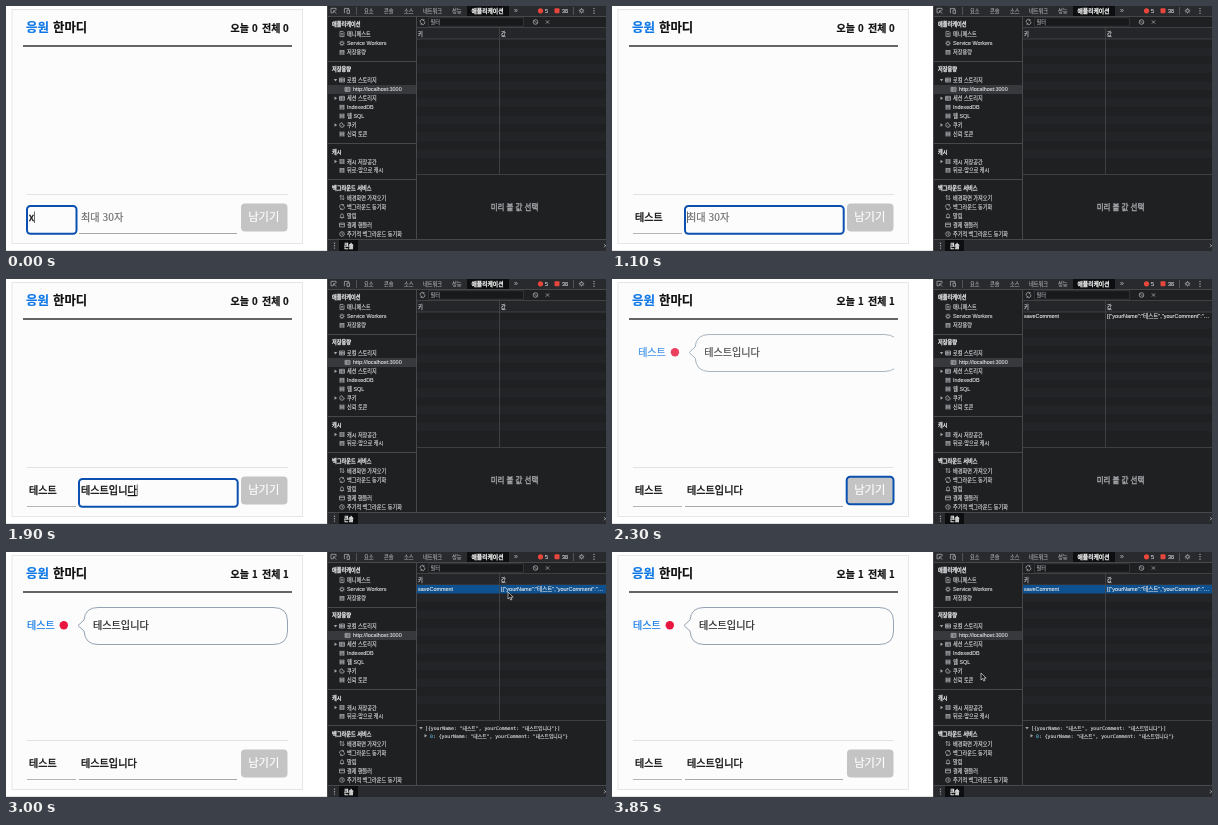
An HTML page that plays this animation: 600x245 px, repeating every 3900 ms.

```html
<!DOCTYPE html>
<html lang="ko">
<head>
<meta charset="utf-8">
<style>
html, body { margin: 0; width: 100%; height: 100%; overflow: hidden; background: #fff; }
svg { display: block; width: 600px; height: 245px; }
text { font-family: "Liberation Sans", "Noto Sans CJK KR", sans-serif; white-space: pre; stroke-width: .12; }
.page text { font-family: "Noto Sans CJK KR", sans-serif; stroke-width: .2; }
.mono text { font-family: "DejaVu Sans Mono", "Noto Sans CJK KR", monospace; }
text.medium { stroke-width: .35; }
</style>
</head>
<body>
<svg id="stage" viewBox="0 0 600 245"></svg>
<script>
const LOOP = 3900;
const BLUE = '#0b50ae', LINK = '#0f78e6', GREY = '#a4a7ab', LIGHT = '#d9dbde';
const PANEL = '#1f2022', BAR = '#292a2d', EDGE = '#46484b';

const text = (x, y, s, size, fill, extra = '') =>
  `<text x="${x}" y="${y}" font-size="${size}" fill="${fill}" stroke="${fill}" ${extra}>${s}</text>`;
const rect = (x, y, w, h, fill, extra = '') =>
  `<rect x="${x}" y="${y}" width="${w}" height="${h}" fill="${fill}" ${extra}/>`;
const line = (d, stroke, width = 1, extra = '') =>
  `<path d="${d}" fill="none" stroke="${stroke}" stroke-width="${width}" ${extra}/>`;
const dot = (x, y, r, fill) => `<circle cx="${x}" cy="${y}" r="${r}" fill="${fill}"/>`;
const group = (id, body, extra = '') => `<g id="${id}" ${extra}>${body}</g>`;
const BOLD = 'font-weight="700"', MEDIUM = 'class="medium"';

// Small line icons, drawn around their own centre
const shapes = {
  doc: 'M-2-2.6H1L2-1.6V2.6H-2ZM-1-.6H1M-1 .9H1',
  gear: 'M-1.5 0A1.5 1.5 0 1 0 1.5 0A1.5 1.5 0 1 0-1.5 0M0-2.7V-1.5M0 1.5V2.7M-2.7 0H-1.5M1.5 0H2.7M-1.9-1.9L-1-1M1 1L1.9 1.9M-1.9 1.9L-1 1M1-1L1.9-1.9',
  db: 'M-2-1.8H2M-2-.6H2M-2 .6H2M-2 1.8H2M-2-2.4V2.4M2-2.4V2.4',
  table: 'M-2.5-2H2.5V2H-2.5ZM-2.5-.6H2.5M-2.5 .7H2.5M-.8-2V2',
  cookie: 'M0-2.3A2.3 2.3 0 1 0 2.3 0L.8-.3ZM-.8 0V.5M.3 1V1.4',
  arrows: 'M-1.2 2.5V-2.3L-2.4-1M-1.2-2.3L0-1M1.2-2.5V2.3L2.4 1M1.2 2.3L0 1',
  sync: 'M-2.1 .6A2.1 2.1 0 0 1 1.5-1.6M2.1-.6A2.1 2.1 0 0 1-1.5 1.6M1.5-2.8V-1.4H.2M-1.5 2.8V1.4H-.2',
  bell: 'M-2 1.5H2L1.4 .7V-.7A1.4 1.4 0 0 0-1.4-.7V.7ZM-.5 2.3H.5',
  card: 'M-2.5-1.9H2.5V1.9H-2.5ZM-2.5-.6H2.5',
  clock: 'M-2.3 0A2.3 2.3 0 1 0 2.3 0A2.3 2.3 0 1 0-2.3 0M0-1.4V0L1 .7',
  ban: 'M-2.3 0A2.3 2.3 0 1 0 2.3 0A2.3 2.3 0 1 0-2.3 0M-1.6-1.6L1.6 1.6',
  cross: 'M-1.6-1.6L1.6 1.6M1.6-1.6L-1.6 1.6',
  inspect: 'M-.5 2H-2.5V-2.5H2.5V-.5M0 0L2.8 2.8M0 0V2M0 0H2',
  device: 'M-2.6 2.4V-2.4H1.8V-1M0-.8H2.5V2.6H0Z'
};
const icon = (kind, x, y) =>
  line(shapes[kind], GREY, .8, `transform="translate(${x} ${y})"`);
const arrow = (x, y, open) =>
  `<path d="${open ? 'M-1.7-1H1.7L0 1.6Z' : 'M-1-1.7V1.7L1.6 0Z'}" fill="${GREY}" transform="translate(${x} ${y})"/>`;
const menu = (x, y) => [-2.4, 0, 2.4].map(d => dot(x, y + d, .7, GREY)).join('');

function comment() {
  const bubble = 'M92 55.5H267Q281.5 55.5 281.5 69V79Q281.5 92.5 267 92.5H92' +
    'Q79 92.5 78 79L72 73.5L78 68Q79 55.5 92 55.5Z';
  return '<clipPath id="column"><path d="M17 41H282V188H17Z"/></clipPath>' +
    group('comment', group('slide', line(bubble, '#94a3b2') +
      text(21, 76.5, '테스트', 10, LINK) + dot(57.8, 73.3, 4.2, '#e9163f') +
      text(87, 76.5, '테스트입니다', 10.1, '#222')), 'clip-path="url(#column)"');
}

function page() {
  return rect(6, 3.5, 290.5, 234, '#fcfcfc', 'stroke="#e6e6e6"') +
    text(20, 25.5, '응원', 12.5, LINK, BOLD) + text(47, 25.5, '한마디', 12.4, '#111', BOLD) +
    text(224.5, 26, '오늘', 10, '#111', BOLD) + text(256, 26, '전체', 10, '#111', BOLD) +
    text(246, 26, '0', 9.6, '#111', BOLD + ' class="count"') +
    text(277, 26, '0', 9.6, '#111', BOLD + ' class="count"') +
    line('M17 40H286', '#333', 1.5) + line('M21 188.5H282', '#e2e2e2') +
    line('M21 227.5H70', '#b5b5b5') + line('M73 227.5H231', '#a8a8a8') +
    rect(235, 197.5, 46.5, 28, '#c4c4c4', 'rx="4"') +
    text(257.8, 215, '남기기', 11.3, '#fff', 'text-anchor="middle"') +
    comment() +
    text(75, 215, '최대 30자', 10.2, '#707070', 'id="hint"') +
    text(23, 215, '', 10, '#111', 'id="name" ' + MEDIUM) +
    text(75, 215, '', 10.1, '#111', 'id="body" ' + MEDIUM) +
    rect(0, 0, 0, 0, 'none', `id="focus" rx="3.5" stroke="${BLUE}" stroke-width="2"`) +
    line('', '#444', .8, 'id="caret"') + line('', '#111', 1.2, 'id="under"') +
    line('M0 244.5H321', '#e2e2e2');
}

function sidebar() {
  const heads = [[18, '애플리케이션'], [63, '저장용량'], [146, '캐시'], [181.5, '백그라운드 서비스']];
  // y, icon, label, tree arrow (1 closed, 2 open)
  const items = [
    [28, 'doc', '매니페스트'], [37.3, 'gear', 'Service Workers'], [46.3, 'db', '저장용량'],
    [74, 'table', '로컬 스토리지', 2], [92.3, 'table', '세션 스토리지', 1], [101.2, 'db', 'IndexedDB'],
    [110, 'db', '웹 SQL'], [119, 'cookie', '쿠키', 1], [128, 'db', '신뢰 토큰'],
    [155.5, 'db', '캐시 저장공간', 1], [164.3, 'db', '뒤로-앞으로 캐시'],
    [191.5, 'arrows', '배경화면 가져오기'], [201, 'sync', '백그라운드 동기화'], [210, 'bell', '알림'],
    [219, 'card', '결제 핸들러'], [228, 'clock', '주기적 백그라운드 동기화']];
  return rect(322, 79, 88, 9, '#38393c') +
    [55, 137, 173].map(y => line(`M322 ${y}.5H410`, EDGE)).join('') +
    heads.map(([y, s]) => text(326, y + 2, s, 5.2, LIGHT, MEDIUM)).join('') +
    items.map(([y, kind, s, tree]) => icon(kind, 336, y) +
      text(341, y + 2, s, /[A-Z]/.test(s) ? 5.4 : 5.15, LIGHT) +
      (tree ? arrow(329.5, y, tree > 1) : '')).join('') +
    icon('table', 341.5, 83.4) + text(347, 85.4, 'http://localhost:3000', 5.45, LIGHT);
}

function toolbar() {
  const tabs = [[358, '요소'], [378, '콘솔'], [398, '소스'], [417, '네트워크'], [446, '성능']];
  return rect(321, 0, 279, 10, BAR) + rect(461, 0, 42, 10, '#0d0e10') +
    line('M321 10.5H600', EDGE) +
    icon('inspect', 327.5, 4.8) + icon('device', 341, 4.8) + line('M350.5 1V9', '#505255') +
    tabs.map(([x, s]) => text(x, 6.8, s, 5.2, GREY)).join('') +
    text(465.5, 6.8, '애플리케이션', 5.8, '#f0f0f0', MEDIUM) + text(508, 7, '»', 7, GREY) +
    dot(534.5, 4.8, 2.6, '#e8453c') + text(539, 6.8, '5', 5.4, LIGHT) +
    rect(548.5, 2.2, 5, 5, '#e8453c', 'rx="1"') + text(556, 6.8, '38', 5.4, LIGHT) +
    line('M567.5 1V9', '#505255') + icon('gear', 575.5, 4.8) + menu(588, 4.8);
}

function storage() {
  let stripes = '';
  for (let y = 41.5; y < 160; y += 17) stripes += rect(411, y, 189, 8.5, '#232427');
  return stripes + icon('sync', 416.5, 16) +
    rect(422.5, 11.8, 95, 8.4, '#18191b', 'stroke="#3c3e41" stroke-width=".7"') +
    text(424.5, 18, '필터', 5.2, GREY) + icon('ban', 529.5, 16) + icon('cross', 541.5, 16) +
    rect(411, 21, 189, 12, '#252629') + line('M411 21.5H600M411 33H600', EDGE, .8) +
    text(412, 29.5, '키', 5.3, LIGHT) + text(495, 29.5, '값', 5.3, LIGHT) +
    group('selected', rect(411, 33, 189, 8.5, '#0e5190')) +
    line('M493.5 21V168M411 168.5H600', EDGE, .8) +
    group('entry', text(412, 39.2, 'saveComment', 5.45, '#e6e6e6') +
      text(495, 39.2, '[{"yourName":"테스트","yourComment":"…', 5.5, '#e6e6e6')) +
    text(508.5, 204, '미리 볼 값 선택', 7.5, '#a0a3a7', 'id="empty" text-anchor="middle" ' + MEDIUM);
}

function preview() {
  const entry = '{yourName: "테스트", yourComment: "테스트입니다"}';
  return arrow(415, 176, true) + text(419, 178, `[${entry}]`, 4.8, LIGHT) +
    arrow(419.5, 183.8, false) +
    text(424, 185.6, `<tspan fill="#5db0d7" stroke="#5db0d7">0</tspan>: ${entry}`, 4.8, LIGHT);
}

function drawer() {
  return rect(321, 233.5, 279, 11.5, BAR) + line('M321 233.5H600', EDGE) +
    menu(328.5, 239.7) + rect(333, 234, 19, 11, '#0d0e10') +
    text(338, 242, '콘솔', 5.2, '#f0f0f0', MEDIUM) + icon('cross', 599.5, 239.7);
}

const stage = document.getElementById('stage');
stage.innerHTML = group('page', page(), 'class="page"') +
  rect(321, 0, 279, 245, PANEL) + sidebar() + storage() +
  group('preview', preview(), 'class="mono"') + toolbar() + drawer() +
  line('M410.5 11V233M321.5 0V245', EDGE) +
  '<path id="pointer" d="M0 0V7L1.7 5.5L2.8 8L4 7.5L2.9 5.1H5.2Z" fill="#111" stroke="#ddd" stroke-width=".7"/>';

const $ = id => document.getElementById(id);
const show = (id, on) => $(id).setAttribute('visibility', on ? 'visible' : 'hidden');
const set = (id, attrs) => Object.entries(attrs).forEach(([k, v]) => $(id).setAttribute(k, v));

// Each entry holds from its time until the next one
const nameKeys = [[0, 'x'], [300, ''], [500, 'ㅌ'], [700, '테'], [750, '텟'], [800, '테스'],
  [900, '테슽'], [950, '테스트']];
const bodyKeys = [[0, ''], [1250, 'ㅌ'], [1300, '테'], [1350, '텟'], [1400, '테스'], [1450, '테슽'],
  [1500, '테스트'], [1550, '테스틍'], [1600, '테스트이'], [1650, '테스트입'], [1700, '테스트입ㄴ'],
  [1750, '테스트입니'], [1850, '테스트입닏'], [1900, '테스트입니다']];
const fields = {
  name: { x: 23, box: [21, 200, 49.5, 27.7] },
  body: { x: 75, box: [73, 200, 158.7, 27.7] },
  button: { box: [234.7, 197.7, 46.8, 27.6] }
};
const path = [[2500, 330, 180], [2850, 502, 40], [3150, 502, 40], [3750, 369, 121]];

const at = (keys, t) => keys.filter(k => k[0] <= t).pop()[1];
const ease = p => p * p * (3 - 2 * p);

function pointerAt(t) {
  const i = path.findIndex(p => p[0] > t);
  if (i < 1) return path[i ? path.length - 1 : 0].slice(1);
  const [t0, x0, y0] = path[i - 1], [t1, x1, y1] = path[i];
  const p = ease((t - t0) / (t1 - t0));
  return [x0 + (x1 - x0) * p, y0 + (y1 - y0) * p];
}

function drawFocus(t) {
  const key = t < 1050 ? 'name' : t < 2050 ? 'body' : 'button';
  const { x, box: [bx, by, w, h] } = fields[key];
  set('focus', { x: bx, y: by, width: w, height: h });
  show('focus', t < 2900);
  const typing = key !== 'button';
  show('caret', typing);
  show('under', typing);
  if (!typing) return;
  const el = $(key), s = el.textContent;
  const end = x + (s ? el.getComputedTextLength() : 0);
  set('caret', { d: `M${end + .5} 205.5V217` });
  set('under', { d: /[ㄱ-힣]$/.test(s) ? `M${end - 9.2} 216.6H${end}` : '' });
}

function drawComment(t) {
  const sent = t >= 2150;
  show('comment', sent);
  show('entry', sent);
  document.querySelectorAll('.count').forEach(el => el.textContent = sent ? 1 : 0);
  const left = (1 - Math.min(1, Math.max(0, t - 2150) / 350)) ** 3;
  set('comment', { opacity: 1 - left });
  set('slide', { transform: `translate(${28 * left} 0)` });
}

function render(t) {
  $('name').textContent = at(nameKeys, t);
  $('body').textContent = at(bodyKeys, t);
  show('hint', t < 1250);
  drawFocus(t);
  drawComment(t);
  const picked = t >= 2900;
  show('selected', picked);
  show('preview', picked);
  show('empty', !picked);
  show('pointer', t >= 2500);
  set('pointer', { transform: `translate(${pointerAt(t)})` });
}

const start = performance.now();
function tick() {
  render((performance.now() - start) % LOOP);
  requestAnimationFrame(tick);
}
tick();
</script>
</body>
</html>
```
